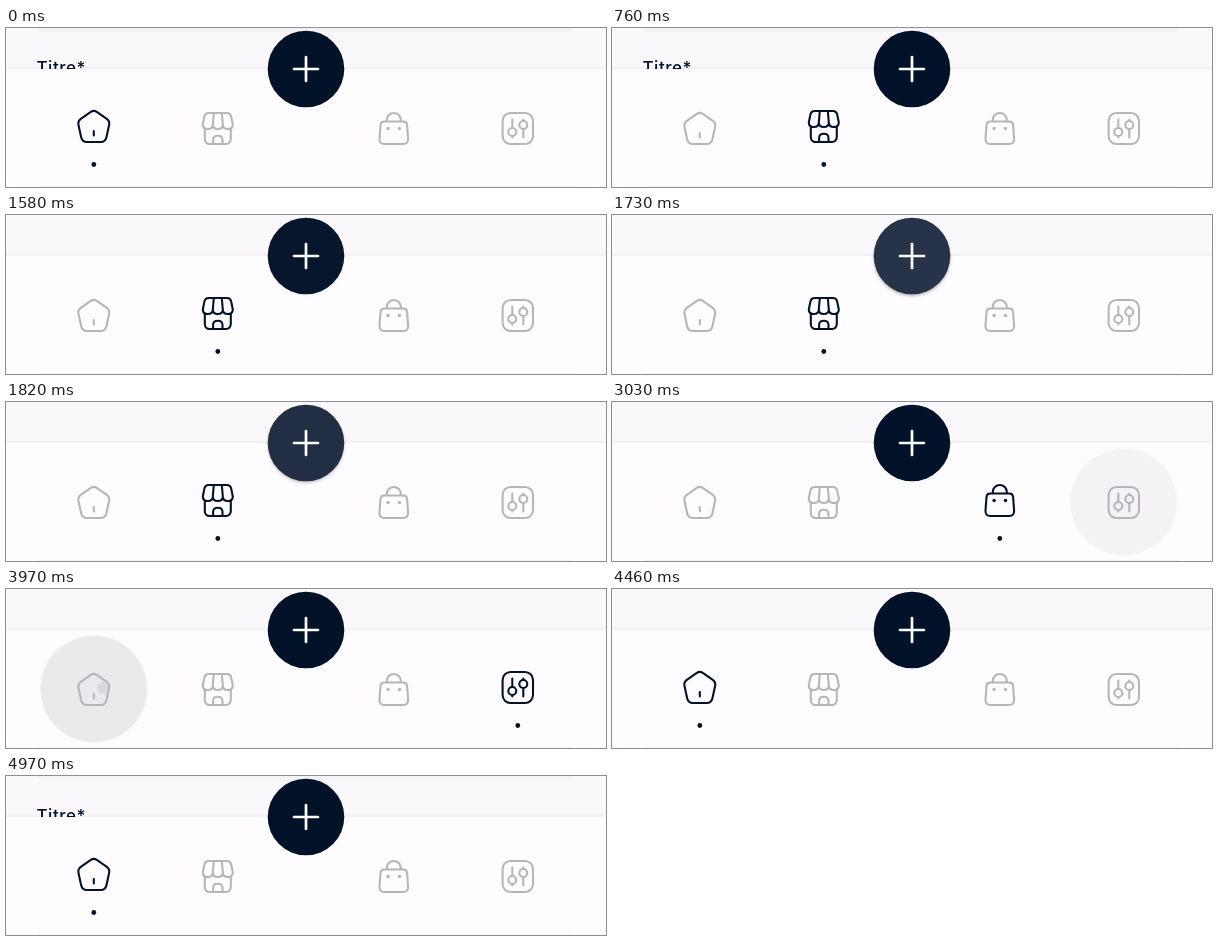
An HTML page that plays this animation: 600 px wide and 159 px high, repeating every 5.37 s.

```html
<!DOCTYPE html>
<html lang="fr">
<head>
<meta charset="utf-8">
<title>Navigation bar</title>
<style>
html, body { margin: 0; height: 100%; overflow: hidden; background: #faf8fb; }
svg { display: block; width: 600px; height: 159px; }
text { font: 500 17px Inter, "Open Sans", sans-serif; letter-spacing: .5px; fill: #021329; }
.icon { fill: none; stroke-width: 2.1; stroke-linecap: round; stroke-linejoin: round; }
.eye { fill: currentColor; stroke: none; }
</style>
</head>
<body>
<svg viewBox="0 0 600 159">
  <defs>
    <linearGradient id="edge" x2="0" y2="1">
      <stop offset="0" stop-color="#000" stop-opacity="0"/>
      <stop offset="1" stop-color="#000" stop-opacity=".04"/>
    </linearGradient>
    <filter id="blur"><feGaussianBlur stdDeviation="1.5"/></filter>
  </defs>
  <g id="form">
    <rect x="31" y="-20" width="537" height="24" rx="6" fill="#f4f2f5"/>
    <text x="30.5" y="46">Titre*</text>
  </g>
  <rect y="37" width="600" height="4" fill="url(#edge)"/>
  <rect y="41" width="600" height="118" fill="#fefcfe"/>
  <path d="M32 158.5H568" stroke="#f5f3f6"/>
  <g id="tabs"></g>
  <circle id="shadow" cx="300" cy="43" r="38" filter="url(#blur)"/>
  <circle id="button" cx="300" cy="41" r="38.3"/>
  <path d="M288 41H312M300 29V53" stroke="#fff" stroke-width="2.7" stroke-linecap="round"/>
</svg>
<script>
const LOOP = 5370, DARK = '#021329', GREY = '#b3b7bc';
const $ = id => document.getElementById(id);
const ramp = (t, a, b) => Math.min(1, Math.max(0, (t - a) / (b - a)));

// press..release: the highlight is held; leave: another tab takes over
const tabs = [
  { x: 88, press: 3760, full: 3970, release: 4460, touch: [9.5, -1],
    art: `<path d="M-3 -14.6Q0 -16.6 3 -14.6L13 -7.6Q16.2 -5.2 15.3 -1.5L12.7 10.5Q11.6 15.5 7 15.5H-7Q-11.6 15.5 -12.7 10.5L-15.3 -1.5Q-16.2 -5.2 -13 -7.6ZM0 4.5V9"/>` },
  { x: 212, press: 60, full: 190, release: 760, touch: [6, 3],
    art: `<path d="M-13 0V10Q-13 15.5 -8 15.5H8Q13 15.5 13 10V0M-9 -15.5H9Q13 -15.5 13.6 -11L15 -4Q15 .5 10 .5T5 -4Q5 .5 0 .5T-5 -4Q-5 .5 -10 .5T-15 -4L-13.6 -11Q-13 -15.5 -9 -15.5M-5 -4L-4 -15.5M5 -4L4 -15.5M-4.7 15.5V11.5Q-4.7 7.2 0 7.2T4.7 11.5V15.5"/>` },
  { x: 388, press: 2370, full: 2580, release: 2610, touch: [8.5, 5.5],
    art: `<path d="M-7 -7V-8.5A7 7 0 0 1 7 -8.5V-7M-9.5 -7H9.5Q13 -7 13.3 -3.5L14.3 10Q14.5 15.5 9.5 15.5H-9.5Q-14.5 15.5 -14.3 10L-13.3 -3.5Q-13 -7 -9.5 -7Z"/><circle class="eye" cx="-5.7" r="1.7"/><circle class="eye" cx="5.7" r="1.7"/>` },
  { x: 512, press: 2970, full: 3190, release: 3220, touch: [0, 0],
    art: `<rect x="-15.2" y="-15.5" width="30.4" height="31" rx="8"/><circle cx="-5.5" cy="3.5" r="4"/><circle cx="5.5" cy="-3.5" r="4"/><path d="M-5.5 -9V-.5M-5.5 7.5V9M5.5 -9V-7.5M5.5 .5V9"/>` }
];

$('tabs').innerHTML = tabs.map(({ x, art, touch: [u, v] }) => `
  <g transform="translate(${x - .2} 100)">
    <circle class="glow" r="53.4"/>
    <circle class="splash" cx="${u}" cy="${v}"/>
    <g class="icon" stroke="currentColor">${art}</g>
    <circle class="dot" cy="36.5" r="2.4" fill="${DARK}"/>
  </g>`).join('');

[...$('tabs').children].forEach((g, i) => {
  for (const part of ['glow', 'splash', 'icon', 'dot']) tabs[i][part] = g.querySelector('.' + part);
});

function activeTab(t) {
  if (t < 760 || t >= 4460) return tabs[0];
  return tabs[t < 2610 ? 1 : t < 3220 ? 2 : 3];
}

function draw(t) {
  const active = activeTab(t);
  for (const tab of tabs) {
    const on = tab === active;
    const held = t >= tab.press && t < tab.release;
    const k = held ? .35 + .65 * ramp(t, tab.press, tab.full) : 0;
    tab.glow.setAttribute('fill-opacity', .075 * k);
    tab.splash.setAttribute('fill-opacity', tab.touch[0] ? .07 * k : 0);
    tab.splash.setAttribute('r', 4 + 2.3 * k);
    tab.icon.setAttribute('transform', `translate(0 ${on ? -1.5 : .5})`);
    tab.icon.setAttribute('color', on ? DARK : GREY);
    tab.dot.setAttribute('visibility', on ? 'visible' : 'hidden');
  }
  $('form').setAttribute('visibility', t < 790 || t >= 4520 ? 'visible' : 'hidden');

  const p = ramp(t, 1560, 1730) * (1 - ramp(t, 1790, 2000));
  const mix = (a, b) => Math.round(a + (b - a) * p);
  $('button').setAttribute('fill', `rgb(${mix(2, 38)},${mix(19, 51)},${mix(41, 72)})`);
  $('shadow').setAttribute('fill-opacity', .3 * p);
}

function tick() {
  draw(performance.now() % LOOP);
  requestAnimationFrame(tick);
}
tick();
</script>
</body>
</html>
```
